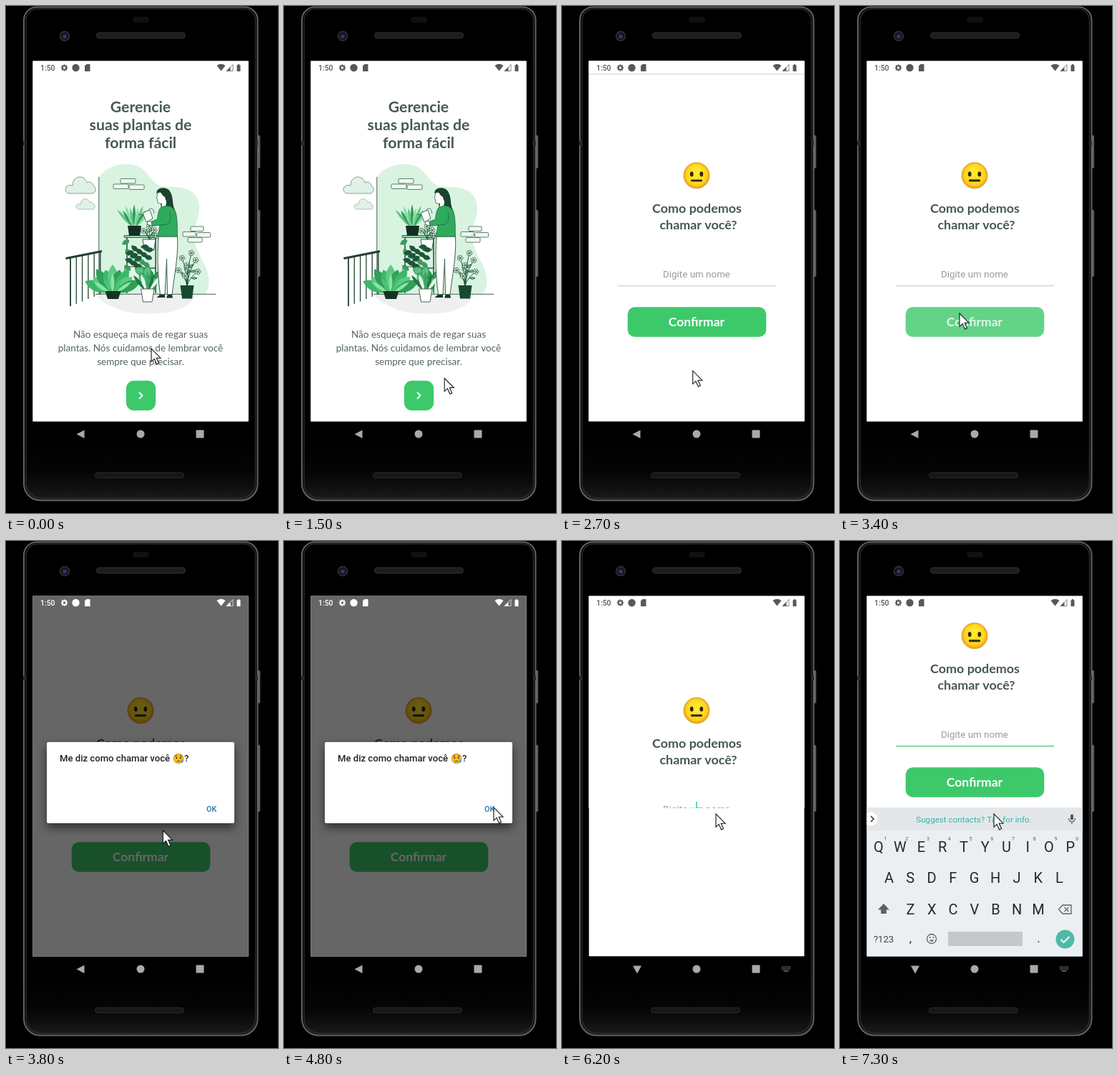
These frames come from a looping animation (380 by 706 pixels, 8000 ms). An HTML page with a canvas:

```html
<!DOCTYPE html>
<html lang="pt">
<head>
<meta charset="utf-8">
<style>
html, body { margin: 0; width: 100%; height: 100%; overflow: hidden; background: #000; }
canvas { display: block; width: 380px; height: 706px; }
</style>
</head>
<body>
<canvas id="stage"></canvas>
<script>
const W = 380, H = 706, LOOP = 8000, STEP = 100;
const TOP = 94, BOTTOM = 578.5, PAGE = 484;
const SCREEN = [37.4, 76.5, 301.3, 502];
const GREEN = '#3dc96a', INK = '#52665a', HEAD = '#47594e', DARK = '#1c4a33', MINT = '#d9f3e1', TEAL = '#35b5a5';
const JOST = 'Jost, Lato, sans-serif', ROBOTO = 'Roboto, sans-serif';
const canvas = document.getElementById('stage');
const c = canvas.getContext('2d');
const dpr = window.devicePixelRatio || 1;
canvas.width = W * dpr;
canvas.height = H * dpr;

// ---------- helpers ----------
const clamp = v => Math.max(0, Math.min(1, v));
const smooth = v => v * v * (3 - 2 * v);

function bezier(x, x1, y1, x2, y2) {
  const f = (s, a, b) => 3 * a * s * (1 - s) ** 2 + 3 * b * s * s * (1 - s) + s ** 3;
  let lo = 0, hi = 1;
  for (let i = 0; i < 24; i++) {
    const mid = (lo + hi) / 2;
    if (f(mid, x1, x2) < x) lo = mid; else hi = mid;
  }
  return f(lo, y1, y2);
}

function text(str, x, y, size, family, color, weight = 400, align = 'center') {
  c.font = `${weight} ${size}px ${family}`;
  c.textAlign = align;
  c.fillStyle = color;
  c.fillText(str, x, y);
}

function rect(x, y, w, h, fill) {
  c.fillStyle = fill;
  c.fillRect(x, y, w, h);
}

function box(x, y, w, h, r, fill, stroke, lw = 1) {
  c.beginPath();
  c.roundRect(x, y, w, h, r);
  paint(fill, stroke, lw);
}

function paint(fill, stroke, lw = 1) {
  if (fill) { c.fillStyle = fill; c.fill(); }
  if (stroke) { c.strokeStyle = stroke; c.lineWidth = lw; c.stroke(); }
}

function shape(d, fill, stroke, lw = 1) {
  const p = new Path2D(d);
  if (fill) { c.fillStyle = fill; c.fill(p); }
  if (stroke) { c.strokeStyle = stroke; c.lineWidth = lw; c.stroke(p); }
}

function oval(x, y, rx, ry, fill, stroke, lw) {
  c.beginPath();
  c.ellipse(x, y, rx, ry, 0, 0, Math.PI * 2);
  paint(fill, stroke, lw);
}

function group(draw, dx = 0, dy = 0, alpha = 1) {
  c.save();
  c.translate(dx, dy);
  c.globalAlpha *= alpha;
  draw();
  c.restore();
}

function clipped(x, y, w, h, draw) {
  c.save();
  c.beginPath();
  c.rect(x, y, w, h);
  c.clip();
  draw();
  c.restore();
}

// ---------- phone ----------
function phone() {
  rect(0, 0, W, H, '#000');
  for (const [y, h] of [[180, 46], [284, 93]]) box(351, y, 4, h, 1.5, '#6a6a6c', '#2c2c2e');
  const g = c.createLinearGradient(0, 600, 0, 690);
  g.addColorStop(0, '#000');
  g.addColorStop(0.55, '#050505');
  g.addColorStop(0.75, '#0e0e0f');
  g.addColorStop(1, '#1d1d1f');
  box(25, 1.5, 326.5, 687, [18, 18, 23, 23], g, '#626264', 2);
  box(28, 4, 320.5, 681.5, [16, 16, 21, 21], null, '#2c2c2e', 1.4);
  rect(24, 188, 4, 6, '#2a2a2c');
  rect(348, 188, 4, 6, '#2a2a2c');
  box(126.5, 37, 124, 8, 4, '#1d1d20', '#303033', 1);
  box(124.5, 650, 124, 7, 3.5, '#161618', '#2c2c2e', 1);
  box(177, 15, 23, 8, 4, '#101014');
  oval(82, 42, 6.5, 6.5, '#15161c', '#34353a', 1.4);
  oval(82, 42.5, 2.8, 2.8, '#30356e');
}

function navBar(typing) {
  const gray = '#a9a9a9';
  shape(typing ? 'M99 591.5H111L105 602.5Z' : 'M109.5 590.5V602L98.5 596.2Z', gray);
  oval(188, 596, 5.5, 5.5, gray);
  box(265.5, 590.5, 11, 11, 1, gray);
  if (!typing) return;
  for (let i = 0; i < 5; i++)
    for (let j = 0; j < 2; j++) rect(307 + i * 2.6, 592.5 + j * 2.6, 1.6, 1.6, '#777');
  rect(309.5, 598, 7, 1.5, '#777');
}

function statusBar(dim) {
  const v = Math.round(88 + 167 * clamp(dim * 2.2)), col = `rgb(${v},${v},${v})`;
  text('1:50', 48, 90, 10.4, ROBOTO, col, 500, 'left');
  oval(81.5, 86, 2.7, 2.7, null, col, 1.9);
  for (let i = 0; i < 8; i++) {
    const a = i * Math.PI / 4;
    c.beginPath();
    c.moveTo(81.5 + 3.2 * Math.cos(a), 86 + 3.2 * Math.sin(a));
    c.lineTo(81.5 + 4.8 * Math.cos(a), 86 + 4.8 * Math.sin(a));
    paint(null, col, 1.5);
  }
  oval(97.5, 86, 5.2, 5.2, col);
  shape('M112.5 81H117.5V91H110V83.5Z', col);
  shape('M294.5 83Q300.5 78.5 306.5 83L300.5 90.5Z', col);
  shape('M317 81.5V90.5H308Z', null, col, 0.7);
  shape('M313.5 85V90.5H308Z', col);
  shape('M322.5 82.3H324V81H326V82.3H327.5V91H322.5Z', col);
}

// ---------- illustration ----------
function leaf(x, y, len, deg, w, fill, stroke) {
  c.save();
  c.translate(x, y);
  c.rotate(deg * Math.PI / 180);
  c.beginPath();
  c.moveTo(0, 0);
  c.quadraticCurveTo(-w, -len * 0.6, 0, -len);
  c.quadraticCurveTo(w, -len * 0.6, 0, 0);
  paint(fill, stroke, 0.7);
  c.restore();
}

function fan(x, y, n, spread, len, w, colors) {
  for (let i = 0; i < n; i++) {
    const k = i / (n - 1) * 2 - 1;
    leaf(x + k * 3, y, len * (1 - 0.15 * (i % 2)), k * spread, w, colors[i % colors.length]);
  }
}

function flowers(x, y, stems) {
  stems.forEach(([dx, dy]) => {
    shape(`M${x} ${y}Q${x + dx * 0.2} ${y + dy * 0.6} ${x + dx} ${y + dy}`, null, DARK, 0.9);
    leaf(x + dx * 0.4, y + dy * 0.55, 8, dx * 4 + 30, 3, '#5fc486', DARK);
    for (let i = 0; i < 5; i++) {
      const a = i * 1.257;
      oval(x + dx + 2.4 * Math.cos(a), y + dy + 2.4 * Math.sin(a), 1.6, 1.6, '#f2fff5', DARK, 0.7);
    }
  });
}

function cloud(x, y, s) {
  c.save();
  c.translate(x, y);
  c.scale(s, s);
  shape('M4 23Q-2 20 1 14Q5 10 10 12Q10 2 19 0Q28 0 30 8Q37 5 39 12Q44 15 41 21Q39 24 35 23Z', '#dff2e5', '#86a391', 1);
  c.restore();
}

function gardener() {
  shape('M213 321H239.5C241 350 235 375 232 402H225.5L224.5 352L222 402H215.5C212 375 211 350 213 321Z', '#fff', '#40604f', 1);
  shape('M215.5 401.5L210.5 406H222L222 401.5ZM226 401.5L224 406.5H233L232 401.5Z', '#17372a');
  shape('M214 257C218 252 228 253 231 262C234 270 232 276 236 284C238 292 232 294 226 291L217 283Z', '#1a4330');
  shape('M211.5 259L211 265L210 267.5L211.5 269L212 274Q215 276 217.5 275L217 283H223L225 268L221 260Z', '#fff', '#2b5a42', 0.8);
  shape('M210.5 261C209 253 223 250 229 258L227 276Q223 272 222 266Q218 264 216 259Z', '#1a4330');
  shape('M216 281C224 276 233 278 237 287C240 298 239 310 239.5 321H211.5C214 314 214 310 215 305L204 306.5L202.5 300.5L211.5 297C212 291 213 284 216 281Z', '#2fab5d', '#1d6d3d', 0.8);
  shape('M229 287Q232 301 225 304L214 305.5', null, '#1d6d3d', 0.9);
  shape('M203 300L198 300L197 304L204 306Z', '#fff', DARK, 0.7);
  shape('M191 288L201 284L205 296L196 301ZM192 291L185 290M198 285Q205 277 207 289', '#f4fff7', '#47705a', 1);
}

function garden() {
  shape('M125 400H265Q262 419 225 427Q175 432 152 420Q130 412 125 400Z', '#efefef');
  shape('M130 238C140 222 165 217 181 222C198 227 203 246 214 250C228 254 250 248 263 262C276 277 268 295 263 312C260 335 274 350 281 368C286 385 283 394 278 401H130Z', MINT);
  cloud(83, 238, 1);
  cloud(98, 268.5, 0.63);
  shape('M129.8 238V401M125 401.3H293', null, '#46604f', 1);
  for (const [x, y, w] of [[160, 240.5, 21], [150, 248, 21], [172, 249, 21], [258, 307, 18], [247, 314.5, 18], [266.5, 315.5, 19], [254, 322.5, 20]])
    box(x, y, w, 6.5, 1, '#effaf2', '#4f705d', 0.9);

  // railing
  for (let i = 0; i < 6; i++)
    shape(`M${90 + i * 8.3} ${350 - i * 1.5}V${418 - i * 3.3}`, null, '#31513f', i % 5 ? 1.4 : 2);
  shape('M83.5 351.5L134 341.5', null, '#213f2f', 3);

  // stand
  shape('M169 321V400M209 321V400M166 365H210M166 385H208', null, '#2e5741', 1.6);
  box(165, 319.5, 48, 3, 0.5, '#8fd0a5', DARK, 0.8);
  box(166, 363, 26, 21, 1, '#e6f7eb', DARK, 0.9);
  fan(179, 308, 9, 40, 32, 4, ['#63c883', '#2f9a58', '#8cdca5']);
  shape('M170 306H189L187 320H172Z', '#162d22');
  flowers(200, 326, [[-8, -13], [0, -19], [7, -14], [11, -6]]);
  shape('M191 325H209L206.5 340H193.5Z', '#fff', DARK, 0.9);
  for (let i = 0; i < 20; i++)
    leaf(162 + (i * 13) % 33, 332 + i * 1.6, 12, 60 + (i * 71) % 110, 7, i % 3 ? '#1e5639' : '#3e9a60');

  // floor plants
  for (let i = 0; i < 9; i++)
    leaf(196 + (i * 11) % 22, 374 + (i * 7) % 22, 18, -60 + i * 17, 11, i % 2 ? '#2f9d59' : '#57c27c', '#1f7241');
  fan(149, 399, 9, 66, 39, 14, ['#3cb768', '#5dcb83', '#2f9f59']);
  fan(149, 400, 5, 55, 28, 5, ['#8ce2a6', '#4cc476']);
  shape('M138.5 397H160.5L157 408H142Z', '#173326');
  fan(197.5, 396, 5, 38, 27, 5, ['#237847', '#e5f8eb', '#3da564']);
  shape('M188.5 394H207L204 412H191.5Z', '#fff', '#4b6656', 1);

  gardener();
  flowers(253, 390, [[-12, -22], [-7, -39], [0, -29], [6, -46], [12, -36], [15, -20], [-3, -14]]);
  shape('M243.5 389H262.5L260 407.5H246Z', '#164a30');
}

// ---------- pages ----------
function welcome(pressed) {
  rect(37, 76, 303, 512, '#fff');
  ['Gerencie', 'suas plantas de', 'forma fácil'].forEach((s, i) => text(s, 188, 148 + i * 25, 21.2, JOST, HEAD, 700));
  garden();
  ['Não esqueça mais de regar suas', 'plantas. Nós cuidamos de lembrar você', 'sempre que precisar.']
    .forEach((s, i) => text(s, 188, 462 + i * 19.2, 13.5, JOST, INK));
  group(() => {
    box(167.8, 521.8, 41.4, 41.4, 11, GREEN);
    shape('M186 538L190.5 542.5L186 547', null, '#fff', 1.8);
  }, 0, 0, pressed ? 0.8 : 1);
}

function neutralFace(x, y) {
  const g = c.createRadialGradient(x, y - 5, 4, x, y, 18.3);
  g.addColorStop(0, '#ffe92e');
  g.addColorStop(0.7, '#fdd51f');
  g.addColorStop(1, '#ee9c18');
  oval(x, y, 18, 18, g, '#d8932a', 0.8);
  oval(x - 6.8, y - 2, 2.4, 3.6, '#33260f');
  oval(x + 6.8, y - 2, 2.4, 3.6, '#33260f');
  box(x - 8, y + 5.6, 16, 2.8, 1.2, '#33260f');
}

function naming({ pressed, focus, caret }) {
  rect(37, 76, 303, 620, '#fff');
  neutralFace(188, 236);
  text('Como podemos', 188.5, 288, 17.9, JOST, HEAD, 700);
  text('chamar você?', 190.5, 311, 17.9, JOST, HEAD, 700);
  text('Digite um nome', 188, 377.5, 13.4, ROBOTO, '#9b9b9b');
  rect(78, 389, 221, 1.2, focus ? '#4cc173' : '#cfd1d0');
  if (caret) rect(187.3, 363, 1.6, 19, '#2fd9a0');
  group(() => {
    box(91.7, 419.3, 193.6, 41.4, 10, GREEN);
    text('Confirmar', 188, 446, 17.5, JOST, '#fff', 700);
  }, 0, 0, pressed ? 0.8 : 1);
}

function dialog() {
  c.save();
  c.shadowColor = 'rgba(0,0,0,.55)';
  c.shadowBlur = 14 * dpr;
  c.shadowOffsetY = 6 * dpr;
  box(57, 280, 262, 113, 2, '#fff');
  c.restore();
  text('Me diz como chamar você', 75, 307, 13.1, ROBOTO, '#222', 500, 'left');
  oval(241, 303, 7, 7, '#f3bd36', '#cf8d22', 0.7);
  shape('M236 300L239 298.5M243 298.5L246 300M238.5 307.5Q241 304.5 243.5 307.5', null, '#4a3213', 1);
  oval(238.3, 302, 1, 1.3, '#4a3213');
  oval(243.7, 302, 1, 1.3, '#4a3213');
  oval(246, 306.5, 1.6, 2.4, '#4ba6e0');
  text('?', 249, 307, 13.1, ROBOTO, '#222', 500, 'left');
  text('OK', 280, 376.7, 10.8, ROBOTO, '#2279ad', 500, 'left');
}

function keyboard(strip) {
  const key = '#23282b', soft = '#5a6266';
  rect(37, 371, 303, 208, '#eceff2');
  rect(37, 371, 303, 32, '#e4e7ea');
  if (strip) {
    oval(43, 387, 9.5, 9.5, '#fff');
    shape('M43 383L47 387L43 391', null, '#333', 1.5);
    text('Suggest contacts? Tap for info.', 187, 392, 11.65, ROBOTO, TEAL);
    box(322, 380.5, 4, 8, 2, '#50575b');
    shape('M319.5 386Q320 391 324 391Q328 391 328.5 386M324 391V394', null, '#50575b', 1.2);
  }
  const row = (keys, x, y) => [...keys].forEach((k, i) => text(k, x + i * 29.75, y, 20, ROBOTO, key));
  row('QWERTYUIOP', 54, 433);
  row('ASDFGHJKL', 68.5, 476);
  row('ZXCVBNM', 98.5, 520);
  [...'1234567890'].forEach((k, i) => text(k, 63.5 + i * 29.75, 417, 7.2, ROBOTO, soft));
  shape('M61 505L69 513.5H64.8V519H57.2V513.5H53Z', soft);
  shape('M311 507H323V519H311L305.5 513ZM313.5 510L319.5 516M319.5 510L313.5 516', null, soft, 1.3);
  text('?123', 61, 559, 13, ROBOTO, '#3d4447');
  text(',', 98.5, 559, 17, ROBOTO, key);
  oval(128, 554, 6.5, 6.5, null, soft, 1.3);
  oval(125.6, 552, 1, 1, soft);
  oval(130.4, 552, 1, 1, soft);
  shape('M124.5 555.5Q128 560 131.5 555.5Z', soft);
  box(151, 544, 104, 20, 1.5, '#c5c8ca');
  text('.', 277.5, 559, 17, ROBOTO, key);
  oval(314.5, 554.5, 13, 13, '#4fbaa8');
  shape('M308.5 555L312.5 559L320.5 551', null, '#fff', 1.8);
}

// ---------- pointer ----------
const path = [
  [0, 203, 477], [300, 272, 481], [1000, 272, 481], [1900, 190, 545], [2400, 190, 545],
  [3200, 167, 428], [3500, 167, 428], [4200, 300, 365], [4300, 300, 365], [4800, 293, 371],
  [5300, 293, 371], [5800, 215, 380], [LOOP, 215, 380]
];

function pointer(t) {
  const i = path.findIndex((p, k) => k > 0 && t <= p[0]);
  const [t0, x0, y0] = path[i - 1], [t1, x1, y1] = path[i];
  const k = smooth((t - t0) / (t1 - t0));
  group(() => shape('M0 0V18.3L4.2 14.4L7.6 22L10.6 20.6L7.2 13.2H13Z', '#fff', '#151515', 1.1),
    x0 + (x1 - x0) * k, y0 + (y1 - y0) * k);
}

// ---------- timeline ----------
function dimAt(t) {
  if (t < 4500) return smooth(clamp((t - 3600) / 200));
  return t < 5200 ? 1 : t < 5300 ? 0.6 : t < 5400 ? 0.27 : 0;
}

function screen(t) {
  rect(...SCREEN, '#fff');
  const p = bezier(clamp((t - 2343) / 425), 0.20833, 0.82, 0.25, 1);
  const state = {
    pressed: t >= 3400 && t < 3600,
    focus: t >= 6000,
    caret: t >= 6000 && t < 7200
  };
  if (t < 2400) {
    welcome(t >= 2000);
  } else if (p < 0.999) {
    const edge = TOP + (1 - p) * PAGE;
    group(() => welcome(true), 0, -p * PAGE * 0.02);
    rect(37, TOP, 303, PAGE + 1, `rgba(0,0,0,${0.1 * clamp(p / 0.36)})`);
    rect(37, 76, 303, TOP - 76, '#fff');
    clipped(37, edge, 303, BOTTOM - edge, () => group(() => naming(state), 0, (1 - p) * PAGE * 0.041));
  } else if (t < 6200) {
    naming(state);
  } else {
    clipped(37, 76, 303, 296, () => group(() => naming(state), 0, t < 6300 ? 0 : -104));
    if (t >= 6300) group(() => keyboard(t >= 6700), 0, t < 6400 ? 70 : 0);
  }

  const dim = dimAt(t);
  if (dim > 0) {
    rect(37, 76, 303, 503, `rgba(0,0,0,${0.6 * dim})`);
    if (t < 5300) group(dialog, 0, 0, dim);
  }
  statusBar(dim);
}

function draw(t) {
  c.setTransform(dpr, 0, 0, dpr, 0, 0);
  phone();
  clipped(...SCREEN, () => screen(t));
  navBar(t >= 6200);
  pointer(t);
}

const start = performance.now();
function tick(now) {
  const t = Math.max(0, now - start) % LOOP;
  draw(Math.floor(t / STEP) * STEP);
  requestAnimationFrame(tick);
}
draw(0);
requestAnimationFrame(tick);
</script>
</body>
</html>
```
